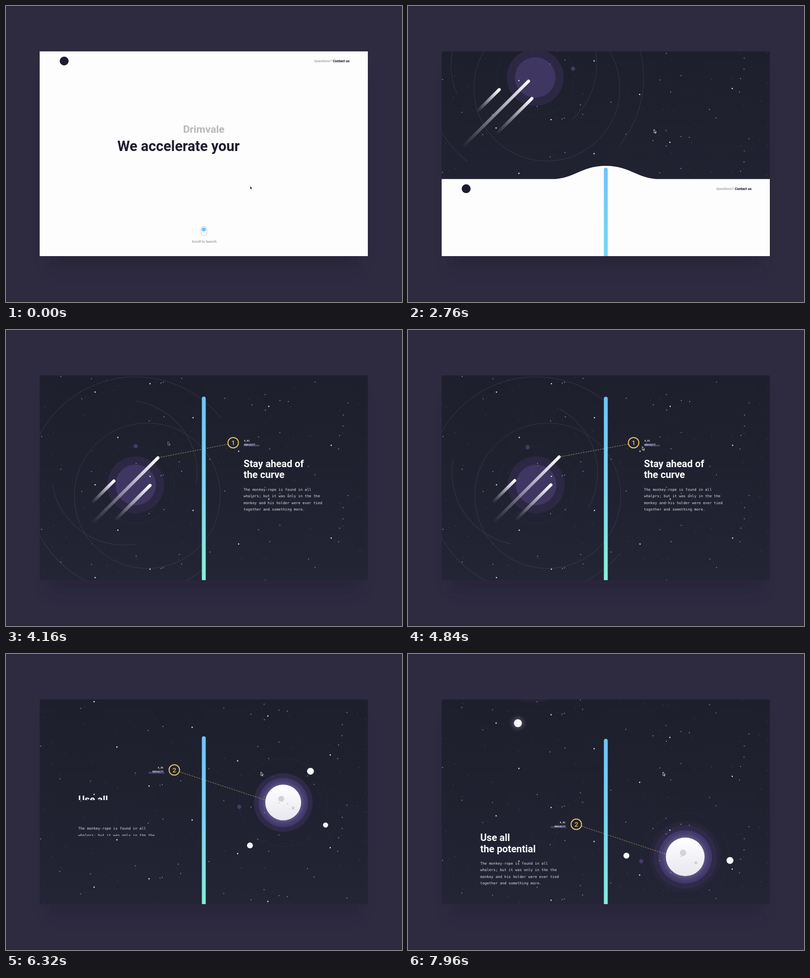
An HTML page for the animation above (8 s loop, 800x600 px).

```html
<!DOCTYPE html>
<html lang="en">
<head>
<meta charset="utf-8">
<title>Launch page</title>
<style>
  html, body { margin: 0; width: 100%; height: 100%; overflow: hidden; background: #2e2b40; }
  svg { display: block; width: 100vw; height: 100vh; }
  text { font-family: Roboto, "Open Sans", sans-serif; font-weight: 700; white-space: pre; }
  .mono { font: 7.34px "DejaVu Sans Mono", monospace; fill: #dddce6; }
  .tag { font: 700 4.65px "DejaVu Sans Mono", monospace; fill: #f4f3f8; }
  .ring { fill: none; stroke: #8f8da8; stroke-opacity: .2; stroke-width: 1; }
  .dots { fill: none; stroke: #8f8da8; stroke-opacity: .24; stroke-width: .8; stroke-dasharray: 1.5 3; }
  .link { stroke: #b3935f; stroke-width: 1; stroke-dasharray: 3 2; }
</style>
</head>
<body>
<svg id="stage" viewBox="0 0 800 600"></svg>
<script>
const LOOP = 8000, TILE = 188, PAGE = 416;

// Timing helpers: linear part, smooth step, decelerating step, smooth there-and-back
const part = (t, start, length) => Math.min(1, Math.max(0, (t - start) / length));
const ramp = (t, start, length) => { const x = part(t, start, length); return x * x * (3 - 2 * x); };
const out = (t, start, length) => 1 - (1 - part(t, start, length)) ** 3;
const pulse = (t, start, length) => Math.sin(Math.PI * part(t, start, length)) ** 2;

const scroll = t => -114 + 428 * ramp(t, 1820, 1650) + 403 * ramp(t, 4906, 1414) + PAGE * ramp(t, 7300, 1958);
const barTop = t => 449 - 14 * ramp(t, 1450, 350) - 300 * ramp(t, 1820, 2330)
  + 78 * (pulse(t, 4800, 1950) + pulse(t, 7490, 1950));
const drift = t => 5 * pulse(t, 3010, 2300);
const cursorX = t => 493 + 4 * ramp(t, 850, 800) - 170 * ramp(t, 2900, 1100) + 188 * ramp(t, 4250, 850);
const cursorY = t => 364.5 - 110 * ramp(t, 850, 800) - 4.5 * ramp(t, 1800, 900)
  - 24 * ramp(t, 2900, 1100) + 13 * ramp(t, 4250, 850);
const comet = t => 5.2 * out(t, 1700, 2500) - 4.2 + .06 * ramp(t, 4300, 1180);
const moonTurn = t => 313 - 403 * out(t, 1700, 2500) - 25 * ramp(t, 4200, 1280);
const grow = t => .3 + .7 * ramp(t, 4900, 1420) + .08 * part(t, 6320, 1640);
const spin = t => (t - 6320) / 30.6 - 36 * (1 - ramp(t, 4900, 1420));

let seed = 7;
const rnd = () => (seed = seed * 16807 % 2147483647) / 2147483647;
const polar = (r, deg) => [r * Math.cos(deg * Math.PI / 180), r * Math.sin(deg * Math.PI / 180)];
const dot = (x, y, r, fill, extra = "") => `<circle cx="${x}" cy="${y}" r="${r}" fill="${fill}" ${extra}/>`;
const text = (x, y, size, fill, str, extra = "") =>
  `<text x="${x}" y="${y}" font-size="${size}" fill="${fill}" ${extra}>${str}</text>`;

const bright = [[289, 166], [178, 183], [376, 235], [529, 212], [224, 275], [468, 115], [655, 103]];
function starTile() {
  let s = bright.map(p => dot(...p, 1.3, "#e4e3ea")).join("");
  for (let i = 0; i < 95; i++) {
    const big = i < 28;
    s += dot((70 + rnd() * 660).toFixed(1), (100 + rnd() * TILE).toFixed(1), big ? .95 : .6, "#a9a8b8",
      `opacity="${(big ? .9 : .2 + rnd() * .4).toFixed(2)}"`);
  }
  return s;
}

const story = ["The monkey-rope is found in all", "whalers; but it was only in the the",
  "monkey and his holder were ever tied", "together and something more."];

function copy(n, x, y, lines) {
  return `<clipPath id="headClip${n}"><rect x="${x - 5}" y="${y - 22}" width="200" height="49"/></clipPath>
  <clipPath id="bodyClip${n}"><rect x="${x - 5}" y="${y + 36}" width="200" height="64"/></clipPath>
  <g clip-path="url(#headClip${n})"><g id="head${n}">${lines.map((s, i) =>
    text(x, y + i * 22.3, 19.8, "#fff", s)).join("")}</g></g>
  <g clip-path="url(#bodyClip${n})"><g id="body${n}">${story.map((s, i) =>
    `<text class="mono" x="${x}" y="${y + 47.5 + i * 13.5}">${s}</text>`).join("")}</g></g>`;
}
function badge(n, side) {
  const anchor = side < 0 ? 'text-anchor="end"' : "";
  return `<g id="badge${n}"><circle r="10.6" fill="#20212f" stroke="#e2c162" stroke-width="2"/>
    ${text(0, 4.8, 13.5, "#e2c162", n, 'text-anchor="middle" style="font-weight:500"')}</g>
  <g id="tag${n}"><rect x="${side < 0 ? -52 : 21}" y="4.2" width="32" height="3.2" fill="#4b4274"/>
    <text class="tag" x="${22 * side}" y="-2.6" ${anchor}>A_01</text>
    <text class="tag" x="${22 * side}" y="5.4" ${anchor}>00018277</text></g>`;
}
const streak = (id, len) => `<line id="${id}" x2="${-len}" y2="${len}" stroke="url(#tail)" stroke-width="6.2" stroke-linecap="round"/>`;

const stage = document.getElementById("stage");
stage.innerHTML = `
<defs>
  <clipPath id="view"><rect x="68" y="92" width="663" height="415"/></clipPath>
  <filter id="soft" x="-20%" y="-20%" width="140%" height="140%"><feGaussianBlur stdDeviation="14"/></filter>
  <filter id="glow" x="-100%" y="-100%" width="300%" height="300%"><feGaussianBlur stdDeviation="5"/></filter>
  <linearGradient id="sky" x2="0" y2="1"><stop stop-color="#1e1f2c"/><stop offset="1" stop-color="#232434"/></linearGradient>
  <linearGradient id="tail" x1="1" y1="0" x2="0" y2="1"><stop stop-color="#fff"/>
    <stop offset=".3" stop-color="#dcdae4" stop-opacity=".85"/><stop offset="1" stop-color="#b5b2c6" stop-opacity="0"/></linearGradient>
  <linearGradient id="beam" gradientUnits="userSpaceOnUse" x1="0" x2="0"><stop stop-color="#6fc3fc"/>
    <stop offset=".5" stop-color="#79d5f0"/><stop offset="1" stop-color="#88efd8"/></linearGradient>
  <linearGradient id="pearl" x2="0" y2="1"><stop stop-color="#fff"/><stop offset="1" stop-color="#e8e6ef"/></linearGradient>
  <g id="tile">${starTile()}</g>
</defs>
<rect width="800" height="600" fill="#2e2b40"/>
<rect x="84" y="130" width="632" height="400" fill="#221f32" opacity=".42" filter="url(#soft)"/>
<g clip-path="url(#view)">
  <rect x="68" y="92" width="663" height="415" fill="url(#sky)"/>
  <g id="one">
    <circle class="ring" cx="23.5" cy="22" r="147.5"/>
    <circle id="arcs" class="ring" r="147" pathLength="360" stroke-dasharray="90 72 90 108"/>
    <circle id="orbit" class="ring" r="219" pathLength="360" stroke-dasharray="270 90"/>
    <circle class="dots" r="78"/>
    ${dot(0, 0, 57.5, "#2c2843")}${dot(0, 0, 41, "#3f3762")}
    ${dot(0, 0, 4.3, "#433a66", 'id="moon"')}
  </g>
  <g id="two">
    <circle class="dots" r="89"/>
    ${dot(-88.8, 8.8, 4.2, "#453c69")}
    <g id="globe">
      ${dot(0, 0, 67, "#27253a", 'id="aura"')}${dot(0, 0, 59.5, "#2f2a48")}${dot(0, 0, 50, "#41396a")}
      ${dot(0, 0, 39, "#6a6292", 'filter="url(#glow)"')}${dot(0, 0, 36.2, "url(#pearl)")}
      ${dot(-4, -7.6, 6, "#d3d2d9")}${dot(20, 11.2, 2.9, "#d3d2d9")}
    </g>
    ${[7, 5.2, 6].map((r, i) => dot(0, 0, r, "#f7f6fa", `id="sat${i}"`)).join("")}
  </g>
  <g id="three">
    ${dot(255, 0, 103, "#242336")}
    ${dot(222, 145, 11, "#77728f", 'opacity=".6" filter="url(#glow)"')}${dot(222, 145, 8, "#f7f6fa")}
  </g>
  <g id="stars">${[-1, 0, 1, 2].map(i => `<use href="#tile" y="${i * TILE}"/>`).join("")}</g>
  <g id="oneTop">
    ${streak("streakA", 45)}${streak("streakB", 134)}${streak("streakC", 72)}
    <line id="link1" class="link"/>
    <g transform="translate(197 -85.5)">${badge(1, 1)}</g>
    ${copy(1, 218, -36, ["Stay ahead of", "the curve"])}
  </g>
  <g id="twoTop">
    <line id="link2" class="link"/>
    <g transform="translate(-220 -66)">${badge(2, -1)}</g>
    ${copy(2, -414, -32, ["Use all", "the potential"])}
  </g>
  <g id="page">
    <path id="sheet" fill="#fdfdfd"/>
    ${dot(117.5, 111.5, 9, "#1e1d30")}
    ${text(658, 114.4, 7, "#aaa9af", "Questions?", 'text-anchor="end"')}
    ${text(694, 114.4, 7, "#12111f", "Contact us", 'text-anchor="end"')}
    <g id="title">
      ${text(399.5, 257.3, 21, "#b9b9bb", "Drimvale", 'text-anchor="middle"')}
      ${text(225, 294.4, 28.8, "#1f1d30", "We accelerate your")}
      <clipPath id="wordClip"><rect id="wipe" x="476" y="260" height="50"/></clipPath>
      <g clip-path="url(#wordClip)"><path d="M477 267.5L574.5 266V302H477Z" fill="#1e1f2e"/>
        ${text(481.5, 294.4, 28.8, "#fcd64f", "future.")}</g>
    </g>
    <g id="hint"><rect x="394" y="446.5" width="11.6" height="19.5" rx="5.8" fill="#fff" stroke="#c6c6ca"/>
      ${text(400.3, 480, 7.2, "#a9a9ad", "Scroll to launch", 'text-anchor="middle"')}</g>
  </g>
  <rect id="bar" fill="url(#beam)"/>
  <path id="cursor" d="M0 0V7.4L1.7 5.9L2.9 8.5L4 8L2.9 5.5H4.8Z" fill="#111" stroke="#fff" stroke-width=".8"/>
</g>`;

const el = {};
stage.querySelectorAll("[id]").forEach(e => el[e.id] = e);
const set = (id, attrs) => { for (const k in attrs) el[id].setAttribute(k, attrs[k]); };
const move = (id, x, y, more = "") => set(id, { transform: `translate(${x} ${y}) ${more}` });

function reveal(n, t, pop, rise) {
  set("badge" + n, { transform: `scale(${out(t, pop, 350)})` });
  set("tag" + n, { opacity: part(t, pop + 150, 250) });
  const left = 1 - out(t, rise, 900);
  move("head" + n, 0, 50 * left);
  move("body" + n, 0, 60 * left);
}
function link(n, k, x1, y1, x2, y2) {
  set("link" + n, { x1, y1, x2: x1 + (x2 - x1) * k, y2: y1 + (y2 - y1) * k, opacity: k ? 1 : 0 });
}

function drawPage(t, y) {
  const off = y + 114, wave = 92 - 27 * pulse(t, 2400, 700);
  move("page", 0, off);
  set("page", { visibility: off > 427 ? "hidden" : "visible" });
  set("sheet", { d: `M68 92H290C335 92 350 ${wave} 399.5 ${wave}S464 92 509 92H731V700H68Z` });
  set("wipe", { width: 100 * out(t, 160, 480) });
  set("hint", { opacity: 1 - part(t, 1250, 400) });
  set("title", { opacity: 1 - part(t, 2050, 400) });

  const top = barTop(t), wide = 4.2 - .3 * part(t, 1450, 300);
  const bottom = Math.min(520, 457 + off * 1.2);
  set("bar", { x: 399.6 - wide, y: top, width: wide * 2, height: bottom - top, rx: wide });
  set("beam", { y1: top, y2: top + 365 });
}

function drawFirst(t, x, y) {
  move("one", x, y);
  move("oneTop", x, y);
  const turn = moonTurn(t), q = comet(t), bx = 59 * q - 14, by = 8 - 63 * q;
  move("moon", ...polar(78.5, turn));
  move("arcs", -23, -25, `rotate(${-1.6 * (turn + 90) - 81})`);
  set("orbit", { transform: `rotate(${turn + 142})`, opacity: 1 - ramp(t, 5500, 700) });
  move("streakA", 29 * q - 73, 25 - 33 * q);
  move("streakB", bx, by);
  move("streakC", 36 * q - 7, 43 - 42 * q);
  link(1, out(t, 2900, 700), 186, -82.5, bx, by);
  reveal(1, t, 2850, 3000);
}

function drawSecond(t, y) {
  const s = grow(t);
  move("two", 560, y);
  move("twoTop", 560, y);
  set("globe", { transform: `scale(${s})` });
  set("aura", { opacity: part(t, 6300, 1000) });
  [[84, -49], [97, 28], [110, 127.6]].forEach(([r, a], i) => move("sat" + i, ...polar(r * s, a + spin(t))));
  link(2, out(t, 5800, 480), -209, -62, -36 * s, -5 * s);
  reveal(2, t, 5700, 6205);
}

function draw(t) {
  const y = scroll(t), dx = drift(t);
  move("stars", dx * .4, ((y - 459) * .394 % TILE + TILE) % TILE);
  drawPage(t, y);
  drawFirst(t, 257 + dx, y);
  drawSecond(t, y - PAGE);
  move("three", 0, y - PAGE * 2);
  move("cursor", cursorX(t), cursorY(t));
  set("cursor", { opacity: 1 - .45 * (part(t, 3700, 300) - part(t, 4300, 300)) });
}

const start = performance.now();
function tick() {
  draw((performance.now() - start) % LOOP);
  requestAnimationFrame(tick);
}
tick();
</script>
</body>
</html>
```
